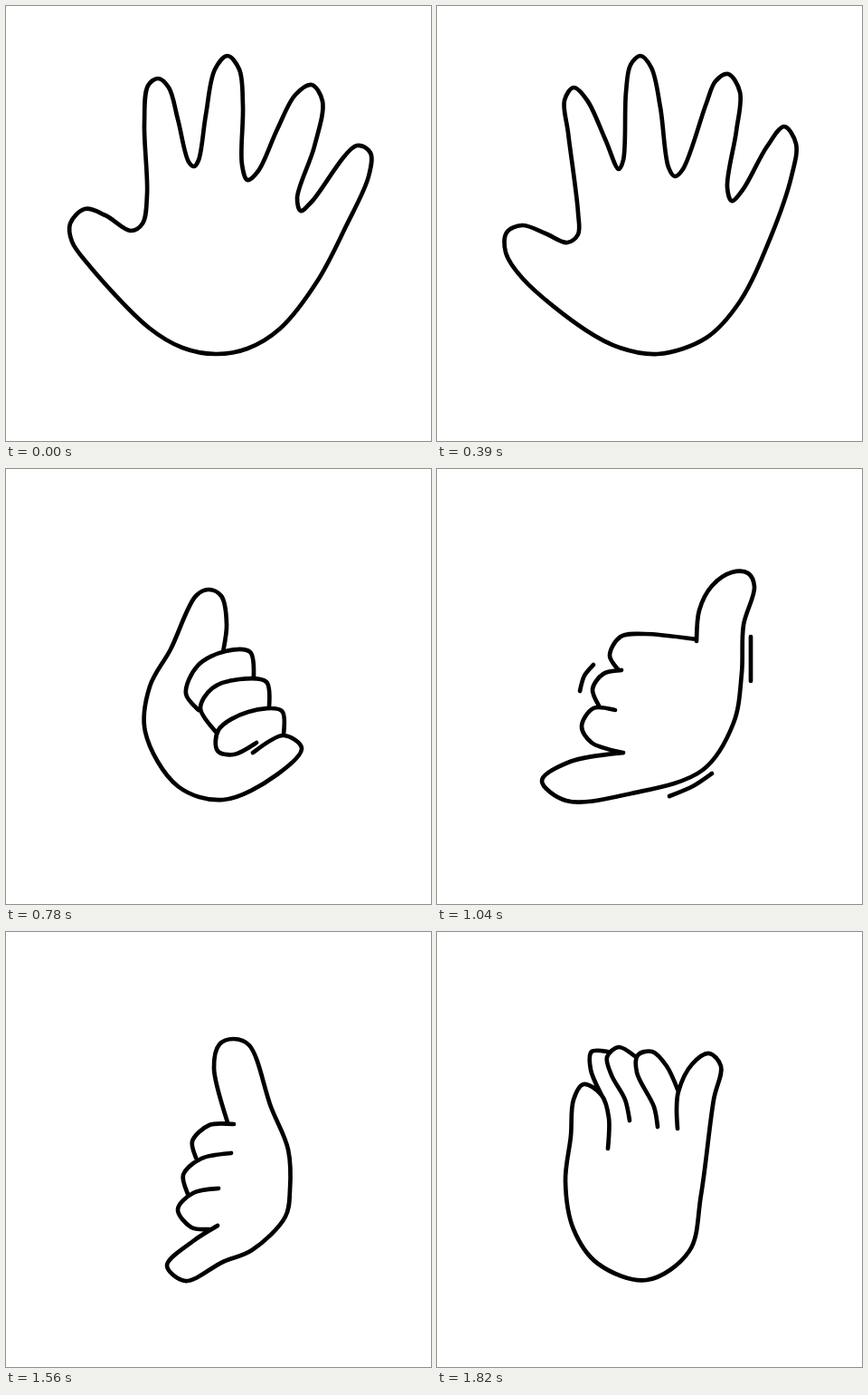
An HTML page that plays this animation: 470x480 px, repeating every 1950 ms.

```html
<!DOCTYPE html>
<html lang="en">
<head>
<meta charset="utf-8">
<title>Waving hand</title>
<style>
  html, body { margin: 0; width: 100%; height: 100%; overflow: hidden; background: #fff; }
  svg { display: block; width: 470px; height: 480px; }
  path { fill: none; stroke: #000; stroke-width: 4.7; stroke-linecap: round; stroke-linejoin: round; }
</style>
</head>
<body>
<svg viewBox="0 0 470 480"><path id="hand"/></svg>
<script>
const STEP = 130;

// Smooth stroke through "x,y" points (centripetal Catmull-Rom as Béziers).
function stroke(text, closed = false) {
  const pts = text.trim().split(/\s+/).map(p => p.split(",").map(Number));
  const n = pts.length;
  const at = i => closed ? pts[(i + n) % n] : pts[Math.max(0, Math.min(n - 1, i))];
  const gap = (a, b) => Math.sqrt(Math.hypot(b[0] - a[0], b[1] - a[1])) || 1;
  const slope = (a, b, c, k) => {
    const u = gap(a, b), v = gap(b, c);
    return (b[k] - a[k]) / u - (c[k] - a[k]) / (u + v) + (c[k] - b[k]) / v;
  };
  let d = "M" + pts[0];
  for (let i = 0; i < (closed ? n : n - 1); i++) {
    const [a, b, c, e] = [at(i - 1), at(i), at(i + 1), at(i + 2)];
    const third = gap(b, c) / 3;
    const out = [0, 1].map(k => b[k] + third * slope(a, b, c, k));
    const into = [0, 1].map(k => c[k] - third * slope(b, c, e, k));
    d += `C${out} ${into} ${c}`;
  }
  return d;
}
const strokes = (...list) => list.map(text => stroke(text)).join("");

const openRight = stroke(`232,384 195,377 158,355 90,284 73,260 71,240 87,224 110,231
  138,248 151,240 156,208 153,130 157,88 168,80 180,90 190,125 202,172 208,177 213,170
  221,120 231,70 245,55 258,70 262,110 261,175 267,192 279,182 300,136 320,98 338,87
  350,105 341,155 322,212 326,226 338,216 388,154 403,162 401,188 376,243 344,304
  303,356 267,378`, true);

const openLeft = stroke(`244,384 202,377 165,358 95,301 76,272 77,250 94,242 120,251
  144,261 156,252 156,228 145,140 141,104 151,90 166,104 186,147 201,180 206,170
  209,95 214,65 225,55 237,68 247,112 256,178 263,188 272,180 298,107 308,83 322,75
  335,95 331,138 321,200 326,215 338,203 365,155 384,133 397,152 392,188 369,255
  335,326 298,366`, true);

const folding = strokes(
  `189,239 190,205 182,180 162,168 151,185 148,225 142,275 151,328 178,366 232,384
   279,352 292,290 306,185 314,148 301,134 282,146 267,176 265,195 266,217`,
  "182,180 170,152 171,132 189,132",
  "213,208 208,185 193,158 188,138 201,127 220,138",
  "244,215 240,193 221,155 222,136 238,132 254,148 267,176");

const palmSide = strokes(
  `240,202 244,172 238,140 224,133 210,140 182,199 159,240 154,290 190,350 240,365
   300,337 327,308 307,294 273,313`,
  "213,266 199,248 212,217 243,201 270,202 274,229",
  "232,290 215,264 228,242 258,232 288,235 291,263",
  "307,293 305,267 268,268 235,288 234,311 252,315 277,302");

const turning = strokes(
  `245,210 230,150 236,124 252,118 269,125 293,193 312,240 314,285 309,314 272,351
   240,364 198,385 178,368 207,341 234,324`,
  "252,212 225,213 206,231 210,249",
  "249,244 216,250 196,268 201,289",
  "235,283 207,288 190,306 205,326 225,328");

const shaka = strokes(
  `287,190 290,156 304,129 326,114 344,115 351,130 339,172 337,225 328,280 294,332
   215,358 143,366 116,344 147,323 206,313`,
  "206,313 171,302 160,284 173,264 197,266",
  "180,263 172,243 184,226 204,222",
  "200,221 191,206 203,185 230,182 287,188");

const lowLines = strokes("347,185 347,234", "173,216 163,228 158,245", "257,361 283,350 304,336");
const highLines = strokes("362,140 351,165 348,194", "205,175 189,186 178,207", "240,365 272,355 300,340");

const pose = (d, angle = 0) => ({ d, angle });
const poses = [
  pose(openRight), pose(openLeft), pose(openRight), pose(openLeft), pose(openRight),
  pose(folding), pose(palmSide), pose(turning),
  pose(shaka + lowLines), pose(shaka + highLines, -8),
  pose(shaka + highLines), pose(shaka + lowLines, -8),
  pose(turning), pose(palmSide), pose(folding)
];

const hand = document.getElementById("hand");
let start, shown;

function draw(now) {
  start ??= now;
  const current = poses[Math.floor((now - start) / STEP) % poses.length];
  if (current !== shown) {
    shown = current;
    hand.setAttribute("d", current.d);
    hand.setAttribute("transform", `rotate(${current.angle} 235 300)`);
  }
  requestAnimationFrame(draw);
}
requestAnimationFrame(draw);
</script>
</body>
</html>
```
